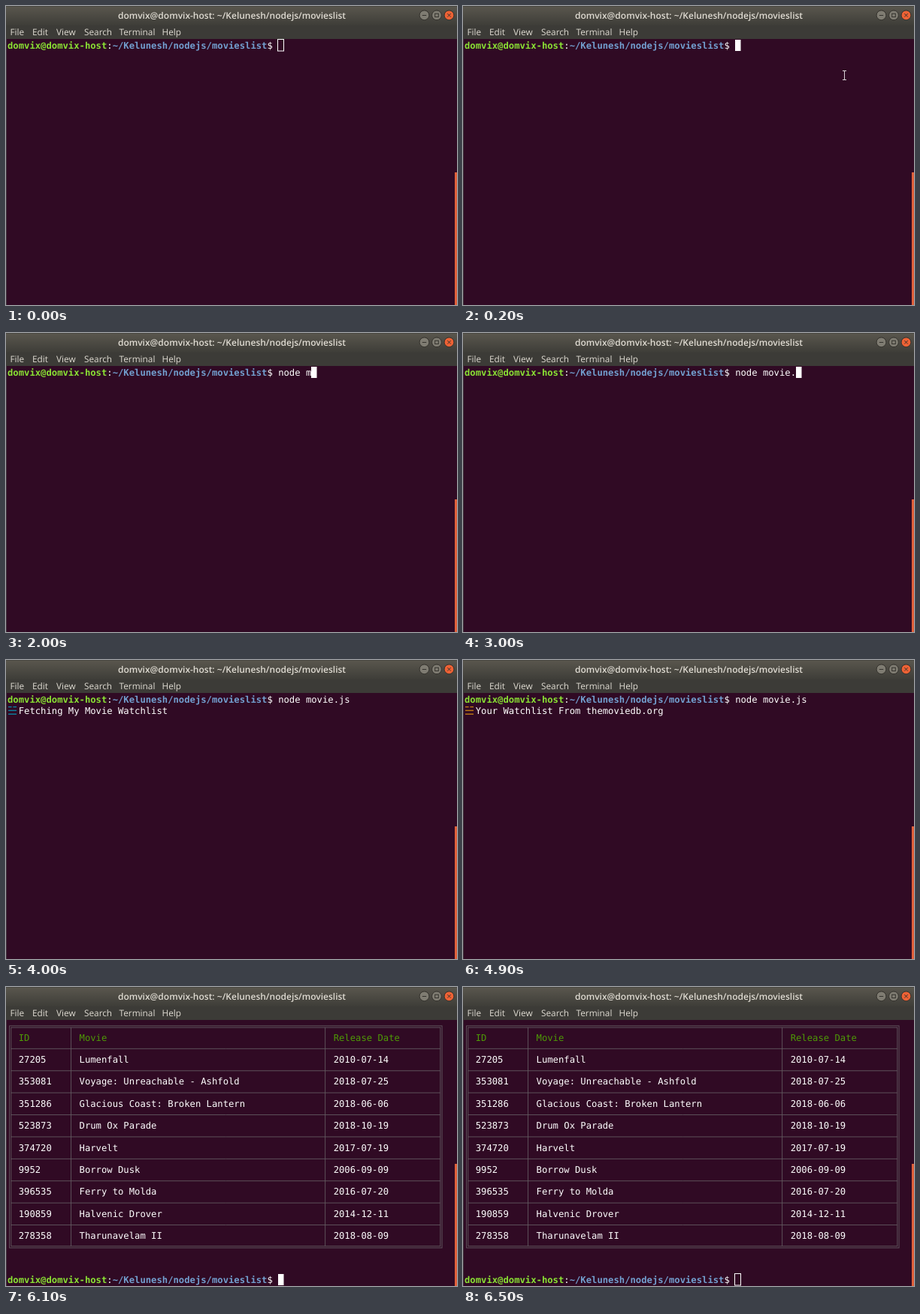
Write an HTML page with a canvas that moves like this. It is 600x399 px and loops after 7500 ms.

```html
<!DOCTYPE html>
<html lang="en">
<head>
<meta charset="utf-8">
<title>Terminal</title>
<style>
html, body { margin: 0; width: 100%; height: 100%; overflow: hidden; background: #300a24; }
canvas { display: block; }
</style>
</head>
<body>
<canvas id="stage" width="600" height="399"></canvas>
<script>
const ctx = document.getElementById('stage').getContext('2d');
const LOOP = 7500;

// Character grid of the terminal
const CELL = 7.35, LINE = 14.7, LEFT = 2, TOP = 45.6, BASE = 56.8;
const colX = c => LEFT + c * CELL;
const rowY = r => TOP + r * LINE;
const midX = c => colX(c + 0.5);
const midY = r => rowY(r + 0.5);

const MONO = '12.21px "DejaVu Sans Mono", monospace';
const UI = '"Open Sans", "Noto Sans", sans-serif';
const WHITE = '#ffffff', GREEN = '#8ae234', BLUE = '#729fcf', HEAD = '#4e9a06';
const CYAN = '#0c83a0', YELLOW = '#c07a14', BORDER = '#625a60';

const HOST = 'domvix@domvix-host', PATH = '~/Kelunesh/nodejs/movieslist';
const PROMPT = HOST.length + PATH.length + 3;
const COMMAND = 'node movie.js';
// [time, number of typed characters]
const KEYS = [[1000, 1], [1200, 3], [1400, 4], [1800, 5], [2000, 6], [2200, 7], [2300, 8],
  [2400, 9], [2500, 10], [3000, 11], [3300, 12], [3400, 13]];
const ENTER = 3600, SPIN = 3700, RELABEL = 4700, DONE = 6100, BLUR = 6500;

const ROWS = [
  ['ID', 'Movie', 'Release Date'],
  ['27205', 'Lumenfall', '2010-07-14'],
  ['353081', 'Voyage: Unreachable - Ashfold', '2018-07-25'],
  ['351286', 'Glacious Coast: Broken Lantern', '2018-06-06'],
  ['523873', 'Drum Ox Parade', '2018-10-19'],
  ['374720', 'Harvelt', '2017-07-19'],
  ['9952', 'Borrow Dusk', '2006-09-09'],
  ['396535', 'Ferry to Molda', '2016-07-20'],
  ['190859', 'Halvenic Drover', '2014-12-11'],
  ['278358', 'Tharunavelam II', '2018-08-09']
];

function rect(x, y, w, h, color) {
  ctx.fillStyle = color;
  ctx.fillRect(x, y, w, h);
}

function line(x1, y1, x2, y2) {
  ctx.beginPath();
  ctx.moveTo(x1, y1);
  ctx.lineTo(x2, y2);
  ctx.stroke();
}

function put(text, col, row, color = WHITE, bold = false) {
  ctx.font = (bold ? 'bold ' : '') + MONO;
  ctx.letterSpacing = '0px';
  ctx.letterSpacing = (CELL - ctx.measureText('M').width).toFixed(3) + 'px';
  ctx.fillStyle = color;
  ctx.fillText(text, colX(col), BASE + row * LINE);
}

function label(text, x, y, font, color) {
  ctx.letterSpacing = '0px';
  ctx.font = font + ' ' + UI;
  ctx.fillStyle = color;
  ctx.fillText(text, x, y);
}

function button(x, fill, sign) {
  ctx.beginPath();
  ctx.arc(x, 12.3, 6.4, 0, 7);
  ctx.fillStyle = fill;
  ctx.fill();
  ctx.lineWidth = 1;
  ctx.strokeStyle = '#33312c';
  ctx.stroke();
  if (sign === 'min') line(x - 2.7, 12.5, x + 2.7, 12.5);
  if (sign === 'max') ctx.strokeRect(x - 2.3, 10.2, 4.6, 4.4);
  if (sign === 'close') {
    line(x - 2.2, 10.1, x + 2.2, 14.5);
    line(x - 2.2, 14.5, x + 2.2, 10.1);
  }
}

function chrome(thumbTop) {
  rect(0, 0, 600, 399, '#300a24');
  const bar = ctx.createLinearGradient(0, 0, 0, 26);
  bar.addColorStop(0, '#5a574e');
  bar.addColorStop(1, '#3e3d38');
  rect(0, 0, 600, 26, bar);
  rect(0, 0, 600, 1, '#484640');
  rect(0, 26, 600, 18, '#3c3b37');
  rect(0, 44, 1, 355, '#413740');
  rect(597, thumbTop, 3, 399 - thumbTop, '#e0603a');

  ctx.textAlign = 'center';
  label(`${HOST}: ${PATH}`, 300.5, 16.6, '600 12px', '#dfdbd2');
  ctx.textAlign = 'left';
  const menu = { File: 5.5, Edit: 35, View: 67, Search: 104, Terminal: 150.5, Help: 207.5 };
  for (const name in menu) label(name, menu[name], 39.2, '11.8px', '#dfdbd2');

  button(556.5, '#7f7c72', 'min');
  button(573, '#7f7c72', 'max');
  button(589.5, '#ee6235', 'close');
}

function prompt(row) {
  put(HOST, 0, row, GREEN, true);
  put(':', HOST.length, row);
  put(PATH, HOST.length + 1, row, BLUE, true);
  put('$', PROMPT - 2, row);
}

function cursor(col, row, hollow) {
  const x = Math.round(colX(col)), y = Math.round(rowY(row)) - 1;
  if (!hollow) return rect(x, y, 7.5, 15, WHITE);
  ctx.lineWidth = 1;
  ctx.strokeStyle = WHITE;
  ctx.strokeRect(x - 0.5, y - 0.5, 8, 15.5);
}

function pointer() {
  ctx.lineWidth = 1;
  ctx.strokeStyle = '#d8d2d6';
  line(507.5, 86, 507.5, 99);
  line(505, 86.5, 510, 86.5);
  line(505, 98.5, 510, 98.5);
}

// Three bars; the split one moves down
function spinner(step, color) {
  for (let i = 0; i < 3; i++) {
    const y = 61.9 + i * 4.8;
    if (i === step % 3) {
      rect(3, y, 4.6, 1.4, color);
      rect(9.4, y, 4.6, 1.4, color);
    } else rect(3, y, 11, 1.4, color);
  }
}

function table() {
  const gap = 1.1, x1 = midX(0), x2 = midX(78), y1 = midY(0), y2 = midY(20);
  ctx.lineWidth = 0.9;
  ctx.strokeStyle = BORDER;
  for (const d of [-gap, gap]) ctx.strokeRect(x1 + d, y1 + d, x2 - x1 - 2 * d, y2 - y1 - 2 * d);
  for (const c of [11, 57]) line(midX(c), y1 + gap, midX(c), y2 - gap);
  for (let r = 2; r < 20; r += 2) line(x1 + gap, midY(r), x2 - gap, midY(r));
  ROWS.forEach((cells, i) => {
    cells.forEach((text, j) => put(text, [2, 13, 59][j], 2 * i + 1, i ? WHITE : HEAD));
  });
}

function draw(t) {
  const done = t >= DONE;
  chrome(done ? 236 : 222);
  if (done) {
    table();
    prompt(23);
    cursor(PROMPT, 23, t >= BLUR);
    return;
  }
  prompt(0);
  const typed = KEYS.reduce((n, [at, count]) => t >= at ? count : n, 0);
  put(COMMAND.slice(0, typed), PROMPT, 0);
  if (t >= 200 && t < 400) pointer();
  if (t < ENTER) {
    if (t < 600 || t >= 900) cursor(PROMPT + typed, 0, t < 100);
  } else if (t < SPIN) {
    cursor(0, 1, false);
  } else {
    const late = t >= RELABEL;
    spinner(Math.floor((t - SPIN) / 100), late ? YELLOW : CYAN);
    put(late ? 'Your Watchlist From themoviedb.org' : 'Fetching My Movie Watchlist', 2, 1);
  }
}

ctx.textRendering = 'geometricPrecision';
const start = performance.now();
function tick() {
  draw((performance.now() - start) % LOOP);
  requestAnimationFrame(tick);
}
tick();
</script>
</body>
</html>
```
